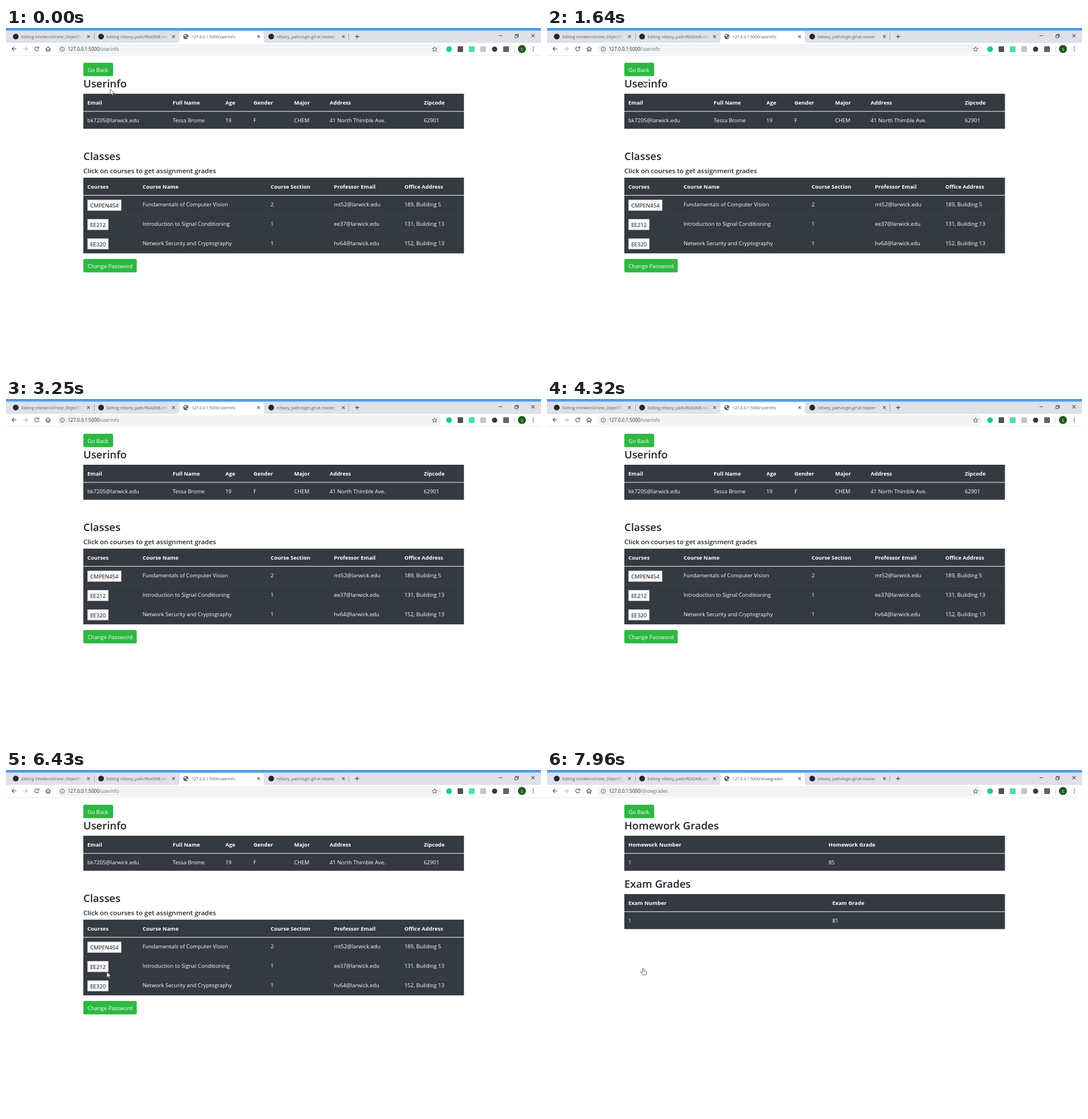
Recreate the animation shown at these times as an HTML page. Size 934 by 600 pixels, loop 8 s.

```html
<!DOCTYPE html>
<html lang="en">
<head>
<meta charset="utf-8">
<title>Student portal</title>
<style>
html, body { margin: 0; width: 100%; height: 100%; overflow: hidden; background: #fff; }
svg { display: block; width: 100vw; height: 100vh; }
text { font-family: "Open Sans", "Noto Sans", sans-serif; white-space: pre; }
.icon { fill: none; stroke: #50545a; stroke-width: 1.1; }
</style>
</head>
<body>
<svg id="stage" viewBox="0 0 934 600" preserveAspectRatio="none">
  <defs>
    <linearGradient id="fade"><stop stop-color="#dee1e6" stop-opacity="0"/><stop offset="1" stop-color="#dee1e6"/></linearGradient>
  </defs>
  <rect width="934" height="600" fill="#fff"/>
  <g id="frame"></g>
  <g id="info"></g>
  <g id="grades"></g>
  <path id="arrow" d="M0 0V10.2L2.4 8L4 11.6L5.5 10.9L4 7.4H7.2Z" fill="#fff" stroke="#222" stroke-width=".7"/>
  <path id="hand" d="M-1.2 7.2V.8a1.1 1.1 0 0 1 2.2 0V4.3q1-.7 1.8.2q1-.5 1.7.4q1.4-.2 1.4 1.1V8q0 3.6-2.6 3.6H.2Q-1 11.6-4.1 7.2q-.5-1.5 1-1.4Z" fill="#fff" stroke="#222" stroke-width=".7"/>
</svg>
<script>
(() => {
const $ = id => document.getElementById(id);
const LOOP = 8000;
const DARK = "#343a40", INK = "#212529", GREEN = "#2eb843";

const rect = (x, y, w, h, fill, more = "") =>
  `<rect x="${x}" y="${y}" width="${w}" height="${h}" fill="${fill}" ${more}/>`;
const disc = (x, y, r, fill) => `<circle cx="${x}" cy="${y}" r="${r}" fill="${fill}"/>`;
const icon = (d, more = "") => `<path class="icon" d="${d}" ${more}/>`;
const text = (x, y, str, size = 9.4, fill = "#fff", weight = 400) =>
  `<text x="${x}" y="${y}" font-size="${size}" fill="${fill}" font-weight="${weight}">${str}</text>`;
const row = (xs, y, cells, weight) =>
  cells.map((c, i) => c && text(xs[i], y, c, 9.4, "#fff", weight)).join("");
const heading = (y, str, size = 18.4) => text(135, y, str, size, INK, 600);
const button = (y, w, str) =>
  rect(135, y, w, 23.5, GREEN, 'rx="2.5"') + text(142.5, y + 15.7, str, 9.5);
const cross = (x, y, r) => icon(`M${x - r} ${y - r}l${2 * r} ${2 * r}m0 ${-2 * r}l${-2 * r} ${2 * r}`);

// Dark table with a bright rule below the header
const table = (y, h, xs, head) =>
  rect(135, y, 664.5, h, DARK) + rect(135, y + 30.2, 664.5, 1.2, "#dee2e6") +
  row(xs, y + 19.3, head, 700);

// Inactive tab title, faded out where it is cut
const tabTitle = (x, str, cut) =>
  text(x, 17.5, str, 6.95, "#5a5e63") +
  (cut ? rect(cut - 14, 8, 14, 14, "url(#fade)") + rect(cut, 8, 18, 14, "#dee1e6") : "");

function drawFrame() {
  let s = rect(0, 0, 934, 5, "#4d9cf0") + rect(0, 4.5, 934, 21.5, "#dee1e6");
  s += '<path d="M298 26Q302 26 302 22V10Q302 6 306 6H446Q450 6 450 10V22Q450 26 454 26Z" fill="#fff"/>';
  s += tabTitle(27, "Editing IntelAeroDrone_ObjectTr", 135);
  s += tabTitle(175.5, "Editing nittany_path/README.md", 285);
  s += tabTitle(472.5, "nittany_path/login.gif at master");
  s += [17, 166, 463].map(x => disc(x, 15, 5, "#24292e")).join("");
  s += disc(314, 15, 4.6, "#5b6066") +
    '<path d="M310.5 13.5l3-2 1.5 1-2 3zm4 2.5 3-1 .5 1.5-2.5 2z" fill="#f2f3f4"/>';
  s += [144, 292.5, 441, 589].map(x => cross(x, 15, 2.3)).join("");
  s += rect(154, 9, 0.8, 12, "#9a9da2") + rect(598, 9, 0.8, 12, "#9a9da2");
  s += icon("M609.5 15h7m-3.5-3.5v7", 'style="stroke-width:1.3"');
  s += icon("M860 13.5h6M888.5 12.5h4.5v4.5h-4.5zM890 12.5v-1.5h4.5v4.5h-1.5", 'style="stroke:#222;stroke-width:.8"');
  s += cross(920, 13.5, 2.8);

  s += rect(0, 26, 934, 22, "#fff") + rect(0, 47.8, 934, 0.8, "#dfe1e4");
  s += rect(88, 28, 672, 18, "#f1f3f4", 'rx="9"');
  s += icon("M18 36.5h-7.5m3.5-3.5l-3.5 3.5l3.5 3.5");
  s += icon("M30 36.5h7.5m-3.5-3.5l3.5 3.5l-3.5 3.5", 'style="stroke:#b9bcc0"');
  s += icon("M56.5 34.5A3.5 3.5 0 1 0 57 37.5M57.2 32.5v2.8h-2.8");
  s += icon("M69 37l4.5-4l4.5 4M70.5 36v4.5h2v-2.5h2v2.5h2v-4.5");
  s += icon("M102 37a3.8 3.8 0 1 1-7.6 0a3.8 3.8 0 1 1 7.6 0M98.2 36.5v2.5M98.2 34.6v1", 'style="stroke-width:.9"');
  s += icon("M748.3 32.8l1.2 2.8 3 .2-2.3 2 .7 3-2.6-1.6-2.6 1.6.7-3-2.3-2 3-.2z", 'style="stroke-width:.9"');
  s += disc(773.5, 37, 5, "#20c7a0") + rect(788.5, 32, 9.5, 10, "#4d5156", 'rx="1"') +
    rect(808, 32, 10, 10, "#4ce0a0", 'rx="1"') + rect(828, 32, 10, 10, "#c3c5c8", 'rx="1"') +
    disc(853, 37, 4.6, "#35383c") + rect(868, 32, 10, 10, "#606469", 'rx="1"');
  s += rect(887, 31, 0.8, 12, "#cfd2d6") + disc(900.7, 36.7, 7, "#1c5a1c") + text(898.7, 39.5, "S", 7.5);
  s += [33.5, 36.7, 39.9].map(y => disc(920.5, y, 0.95, "#50545a")).join("");
  $("frame").innerHTML = s;
}

// Active tab title and address line of one page
function addressBar(page) {
  const host = "127.0.0.1:5000";
  return text(324, 17.5, `${host}/${page}`, 6.92, "#54585d") +
    text(108, 40, `${host}<tspan fill="#6b6f74">/${page}</tspan>`, 8.08, "#2b2e32");
}

function drawInfo() {
  const people = [142, 291, 383, 432, 503, 565, 729.5];
  const classes = [142, 238.5, 462, 572.5, 695.5];
  const courses = [
    ["CMPEN454", 58.5, "Fundamentals of Computer Vision", "2", "mt52@larwick.edu", "189, Building 5"],
    ["EE212", 36, "Introduction to Signal Conditioning", "1", "ee37@larwick.edu", "131, Building 13"],
    ["EE320", 36, "Network Security and Cryptography", "1", "hv64@larwick.edu", "152, Building 13"]
  ];
  let s = addressBar("userinfo") + button(60.8, 52, "Go Back") + heading(103.7, "Userinfo");
  s += table(115, 61.3, people, ["Email", "Full Name", "Age", "Gender", "Major", "Address", "Zipcode"]);
  s += row(people, 165.3, ["bk7205@larwick.edu", "Tessa Brome", "19", "F", "CHEM", "41 North Thimble Ave.", "62901"]);
  s += heading(230.5, "Classes") + heading(254.3, "Click on courses to get assignment grades", 11.5);
  s += table(261.8, 132.4, classes, ["Courses", "Course Name", "Course Section", "Professor Email", "Office Address"]);
  courses.forEach(([code, w, ...cells], i) => {
    const y = 300.8 + i * 33.8;
    if (i) s += rect(135, y - 8.3, 664.5, 0.8, "#3e454b");
    s += rect(142.5, y, w, 18.4, "#fafafa", 'stroke="#d4d6d8" stroke-width=".7"');
    s += text(147, y + 13.2, code, 9.6, "#111") + row(classes, y + 11.5, ["", ...cells]);
  });
  $("info").innerHTML = s + button(404, 93.3, "Change Password");
}

function drawGrades() {
  let s = addressBar("showgrades") + button(60.8, 52, "Go Back");
  [["Homework", 0, 491.5, "85"], ["Exam", 102, 498, "81"]].forEach(([kind, dy, x, grade]) => {
    const xs = [142, x];
    s += heading(103.7 + dy, `${kind} Grades`);
    s += table(115 + dy, 61.3, xs, [`${kind} Number`, `${kind} Grade`]);
    s += row(xs, 165.3 + dy, ["1", grade]);
  });
  $("grades").innerHTML = s;
}

// Pointer stops: time, x, y
const trail = [
  [0, 182, 107], [750, 182, 107], [1540, 168, 93], [2000, 168, 93], [5250, 552, 604],
  [5500, 525, 547], [5640, 465, 452], [6430, 176, 353], [6600, 168, 347], [LOOP, 168, 347]
];
const LEAVE = 2000, ENTER = 5250, HOVER = 6480, NEXT_PAGE = 7640;

function pointerAt(t) {
  const i = trail.findIndex(k => k[0] > t);
  const [t0, x0, y0] = trail[i - 1], [t1, x1, y1] = trail[i];
  let p = (t - t0) / (t1 - t0);
  if (t1 === 6430) p = 1 - (1 - p) ** 2; // slows down near the button
  return [x0 + (x1 - x0) * p, y0 + (y1 - y0) * p];
}

const show = (id, on) => $(id).setAttribute("visibility", on ? "visible" : "hidden");

function render(t) {
  const [x, y] = pointerAt(t);
  const away = t >= LEAVE && t < ENTER;
  show("info", t < NEXT_PAGE);
  show("grades", t >= NEXT_PAGE);
  show("arrow", !away && t < HOVER);
  show("hand", t >= HOVER);
  for (const id of ["arrow", "hand"]) $(id).setAttribute("transform", `translate(${x} ${y})`);
}

function tick() {
  render(performance.now() % LOOP);
  requestAnimationFrame(tick);
}

drawFrame();
drawInfo();
drawGrades();
tick();
})();
</script>
</body>
</html>
```
